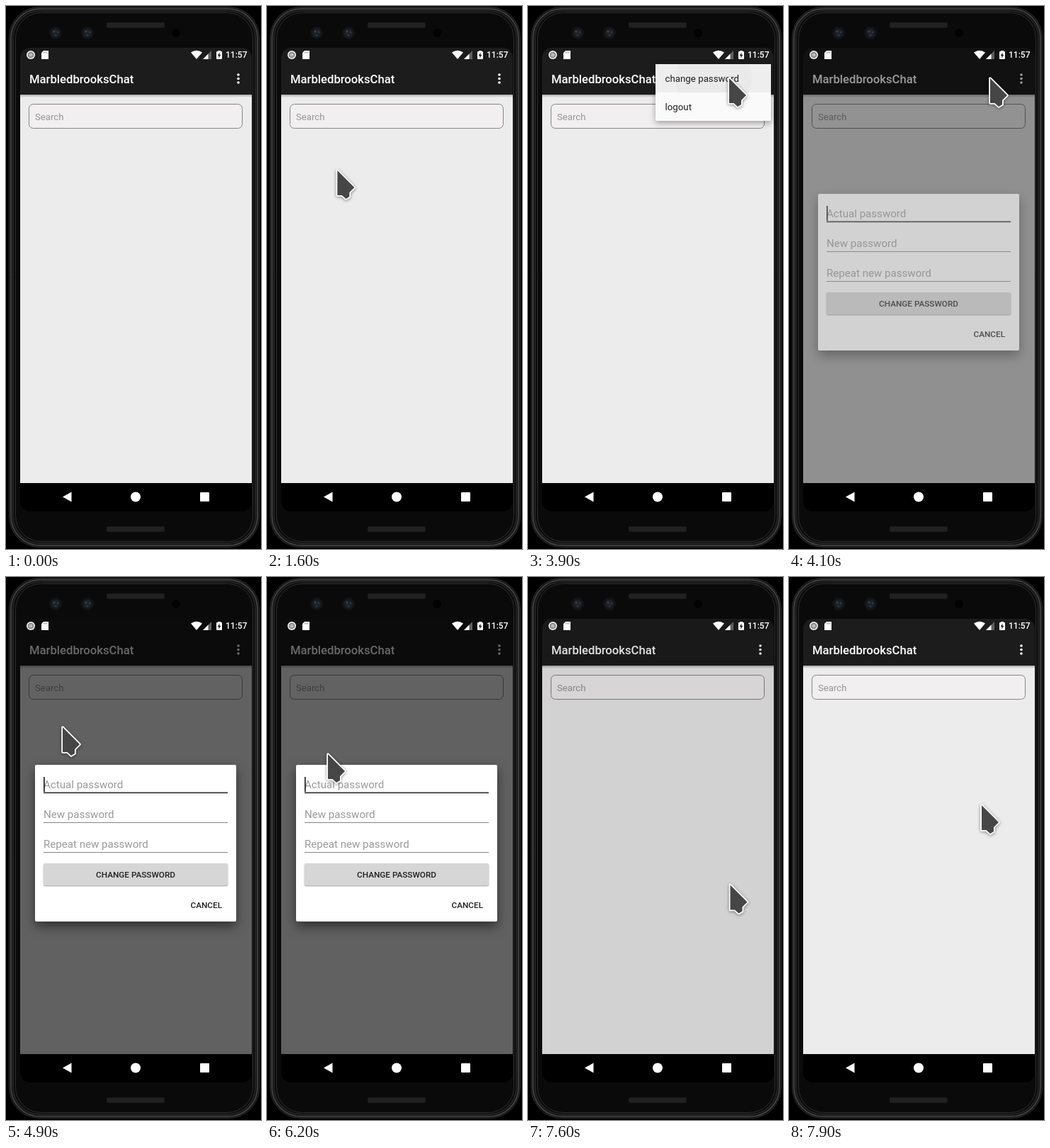
Write an HTML page with a canvas that moves like this. It is 360 px wide and 766 px high and loops after 8 s.

```html
<!DOCTYPE html>
<html lang="en">
<head>
<meta charset="utf-8">
<title>Change password</title>
<style>
html, body { margin: 0; width: 100%; height: 100%; overflow: hidden; background: #000; }
canvas { display: block; width: 360px; height: 766px; }
</style>
</head>
<body>
<canvas id="stage"></canvas>
<script>
const W = 360, H = 766, LOOP = 8000, STEP = 100;
const scale = Math.max(1, window.devicePixelRatio || 1);
const FONT = 'Roboto, "Noto Sans", sans-serif';
const TITLE = 'MarbledbrooksChat';
const DIM = 0.59;

function makeContext(canvas) {
  canvas.width = Math.round(W * scale);
  canvas.height = Math.round(H * scale);
  const c = canvas.getContext('2d');
  c.scale(scale, scale);
  return c;
}
const screen = makeContext(document.getElementById('stage'));
const layer = makeContext(document.createElement('canvas'));
let ctx = screen;

const clamp = v => Math.min(1, Math.max(0, v));
const ramp = (t, from, length) => clamp((t - from) / length);

function rect(x, y, w, h, fill) {
  ctx.fillStyle = fill;
  ctx.fillRect(x, y, w, h);
}

function box(x, y, w, h, r, fill, stroke, width = 1) {
  ctx.beginPath();
  ctx.roundRect(x, y, w, h, r);
  if (fill) { ctx.fillStyle = fill; ctx.fill(); }
  if (stroke) { ctx.strokeStyle = stroke; ctx.lineWidth = width; ctx.stroke(); }
}

function disc(x, y, r, fill) {
  ctx.beginPath();
  ctx.arc(x, y, r, 0, Math.PI * 2);
  ctx.fillStyle = fill;
  ctx.fill();
}

function poly(points, fill) {
  ctx.beginPath();
  points.forEach(([x, y]) => ctx.lineTo(x, y));
  ctx.closePath();
  ctx.fillStyle = fill;
  ctx.fill();
}

function text(str, x, y, size, color, weight = 400, align = 'left') {
  ctx.font = `${weight} ${size}px ${FONT}`;
  ctx.textAlign = align;
  ctx.fillStyle = color;
  ctx.fillText(str, x, y);
}

function shadowed(blur, dy, color, draw) {
  ctx.save();
  ctx.shadowColor = color;
  ctx.shadowBlur = blur * scale;
  ctx.shadowOffsetY = dy * scale;
  draw();
  ctx.restore();
}

// Draws a whole group at one opacity.
function group(alpha, draw) {
  if (alpha <= 0) return;
  layer.clearRect(0, 0, W, H);
  ctx = layer;
  draw();
  ctx = screen;
  ctx.save();
  ctx.globalAlpha = alpha;
  ctx.drawImage(layer.canvas, 0, 0, W, H);
  ctx.restore();
}

function speaker(y) {
  box(142, y, 82, 8, 2, '#1b1b1b');
  for (let x = 143; x < 223; x += 2) rect(x, y + 1, 1, 6, '#272727');
}

function lens(x, y) {
  disc(x, y, 9, '#121417');
  disc(x, y, 6, '#1b2026');
  disc(x - 2, y - 2, 1.6, '#39434d');
  disc(x + 3, y - 1, 1.3, '#323b44');
  disc(x, y + 3, 1.5, '#2c353d');
}

function drawPhone() {
  rect(0, 0, W, H, '#000');
  box(4.5, 1.5, 353, 762, 43, '#151515', '#2b2b2b');
  box(7, 4, 348, 757, 41, null, '#484848', 1.5);
  box(10, 7, 342, 751, 38, '#0a0a0a', '#222', 2);
  box(13.5, 9.5, 335, 746, 36, null, '#2f2f2f');
  speaker(23);
  speaker(734);
  lens(70, 38);
  lens(115, 38);
  disc(240, 38, 6, '#020202');
}

function drawApp() {
  rect(20, 125, 327, 548, '#ececec');
  const shade = ctx.createLinearGradient(0, 125, 0, 129);
  shade.addColorStop(0, 'rgba(0,0,0,.28)');
  shade.addColorStop(1, 'rgba(0,0,0,0)');
  rect(20, 125, 327, 4, shade);
  box(20, 59, 327, 66, [14, 14, 0, 0], '#1c1c1c');
  text(TITLE, 33, 109, 16.65, '#fff', 500);
  for (const y of [97, 102.5, 108]) disc(328, y, 1.8, '#fff');
  box(32.5, 138.5, 301, 34, 6, '#f1efef', '#858585');
  text('Search', 41, 160.5, 13.2, '#969696');
}

function drawStatus() {
  disc(35, 69, 6, '#f2f2f2');
  disc(35, 69, 4.3, '#777');
  disc(35, 69, 2.8, '#bbb');
  poly([[53, 63], [60, 63], [60, 75], [50, 75], [50, 66]], '#fff');
  for (const x of [53.3, 55.3, 57.3]) rect(x, 64.5, 0.9, 2, '#777');

  ctx.beginPath();
  ctx.moveTo(269, 75);
  ctx.lineTo(261, 65.5);
  ctx.quadraticCurveTo(269, 60, 277, 65.5);
  ctx.closePath();
  ctx.fillStyle = '#fff';
  ctx.fill();

  poly([[290, 63], [290, 75], [278, 75]], '#606060');
  poly([[285.5, 67.5], [285.5, 75], [278, 75]], '#fff');
  rect(299, 63, 4, 2, '#fff');
  box(297, 64, 8, 11, 1, '#fff');
  poly([[301.6, 65.5], [298.6, 70.2], [300.6, 70.2], [300.4, 73.5], [303.4, 68.8], [301.4, 68.8]], '#1c1c1c');
  text('11:57', 340.5, 73.3, 12, '#fff', 500, 'right');
}

function drawNav() {
  box(20, 673, 327, 40, [0, 0, 14, 14], '#000');
  poly([[80, 692.5], [92.5, 685.5], [92.5, 699.5]], '#fff');
  disc(183, 692.5, 7, '#fff');
  box(274, 686, 13, 13, 1, '#fff');
}

function drawMenu(t) {
  const x = 1 - ramp(t, 2600, 270);
  const p = 1 - x * x;
  const open = p >= 1;
  group(Math.min(p, 1 - ramp(t, 3900, 150)), () => {
    const w = 163 * p, h = 80 * p;
    const cx = 261.5 + 82 * (1 - p), cy = 122 - 40 * (1 - p);
    ctx.save();
    if (!open) {
      ctx.beginPath();
      ctx.rect(cx - w / 2, cy - h / 2, w, h);
      ctx.clip();
    }
    ctx.translate(cx - 261.5, cy - 122);
    shadowed(8, 3, 'rgba(0,0,0,.35)', () => box(180, 82, 163, 80, 2, '#fafafa'));
    if (t >= 3100) rect(180, 82, 163, 40, '#eeeeee');
    if (t >= 3600) {
      ctx.save();
      ctx.beginPath();
      ctx.rect(180, 82, 163, 40);
      ctx.clip();
      disc(262, 102, t < 3700 ? 36 : 54, 'rgba(0,0,0,.015)');
      ctx.restore();
    }
    text('change password', 193.5, 107.3, 13.3, '#1e1e1e');
    text('logout', 193.5, 147.3, 13.3, '#1e1e1e');
    ctx.restore();
  });
}

function drawDialog(t) {
  const alpha = t < 7300 ? ramp(t, 3950, 250) : 1 - ramp(t, 7300, 175);
  group(alpha, () => {
    shadowed(16, 7, 'rgba(0,0,0,.5)', () => box(41, 265, 284, 221, 2, '#fff'));
    ['Actual password', 'New password', 'Repeat new password'].forEach((hint, i) => {
      text(hint, 53, 298 + 42 * i, 15.1, '#9a9a9a');
      if (i) rect(53, 304 + 42 * i, 260, 1, '#858585');
    });
    rect(53, 303.5, 260, 1.7, '#333');
    if (t < 7300) rect(53, 282, 1.7, 21, '#222');
    shadowed(2, 1, 'rgba(0,0,0,.4)', () => box(53, 404, 260, 31, 2, '#d6d6d6'));
    text('CHANGE PASSWORD', 183, 424, 11.75, '#1f1f1f', 500, 'center');
    text('CANCEL', 305, 467, 11.75, '#1f1f1f', 500, 'right');
  });
}

// Pointer stops: time, x, y
const PATH = [
  [1500, 60, 253], [1800, 178, 190], [2200, 331, 102], [2800, 331, 102],
  [3200, 284, 102], [4100, 284, 102], [4700, 142, 188], [4900, 80, 212],
  [5000, 80, 212], [5200, 190, 218], [5400, 305, 290], [5500, 322, 380],
  [5600, 300, 475], [5700, 220, 514], [5800, 120, 500], [5900, 48, 445],
  [6000, 17, 370], [6100, 36, 295], [6200, 86, 250], [6300, 160, 222],
  [6500, 285, 290], [6600, 306, 370], [6800, 302, 486], [6900, 290, 472],
  [7500, 290, 472], [7900, 272, 322]
];

function drawPointer(t) {
  if (t < PATH[0][0]) return;
  let i = 1;
  while (i < PATH.length - 1 && PATH[i][0] < t) i++;
  const [t0, x0, y0] = PATH[i - 1], [t1, x1, y1] = PATH[i];
  const k = ramp(t, t0, t1 - t0);
  ctx.save();
  ctx.translate(x0 + (x1 - x0) * k, y0 + (y1 - y0) * k);
  const shape = [[0, 0], [24, 24], [17, 31], [17, 37], [12, 40], [6.5, 35], [0, 35]];
  ctx.lineJoin = 'round';
  ctx.lineWidth = 3.6;
  ctx.strokeStyle = '#fff';
  shadowed(4, 1, 'rgba(0,0,0,.35)', () => {
    poly(shape, '#fff');
    ctx.stroke();
  });
  poly(shape, '#464646');
  ctx.restore();
}

function draw(t) {
  drawPhone();
  drawApp();
  const dim = t < 7300 ? ramp(t, 3900, 300) : 1 - ramp(t, 7300, 370);
  if (dim > 0) box(20, 59, 327, 614, [14, 14, 0, 0], `rgba(0,0,0,${DIM * dim})`);
  drawStatus();
  drawNav();
  if (t > 2600 && t < 4100) drawMenu(t);
  if (t > 3950 && t < 7500) drawDialog(t);
  drawPointer(t);
}

const start = performance.now();
function tick() {
  const t = (performance.now() - start) % LOOP;
  draw(Math.floor(t / STEP) * STEP);
  requestAnimationFrame(tick);
}
tick();
</script>
</body>
</html>
```
